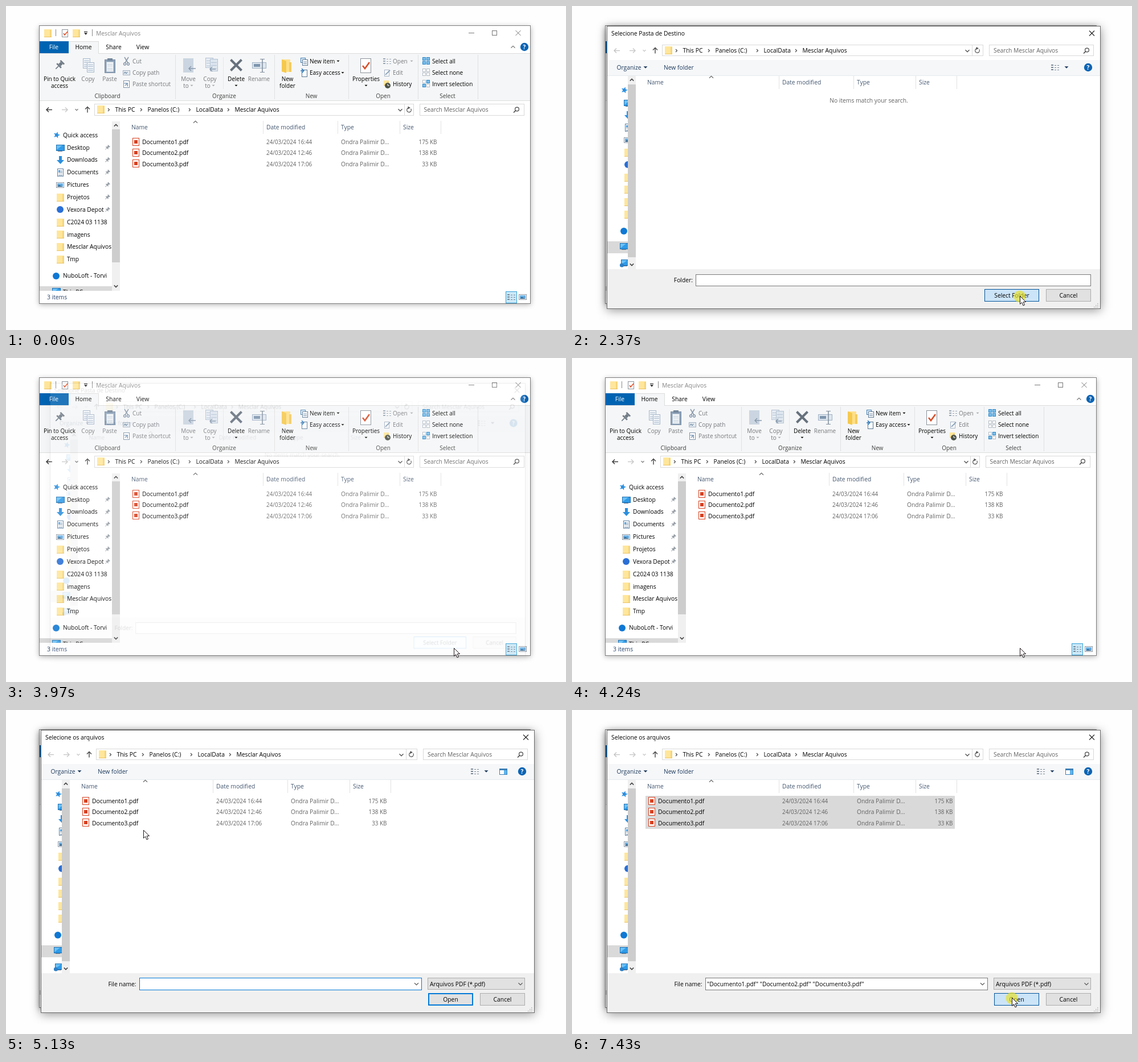
Animation, 983 px wide and 570 px high, one loop 8 s. Source, as an HTML page with a canvas:

```html
<!DOCTYPE html>
<html lang="pt">
<head>
<meta charset="utf-8">
<title>Mesclar Aquivos</title>
<style>
html, body { margin: 0; width: 100%; height: 100%; overflow: hidden; background: #fefefe; }
canvas { display: block; }
</style>
</head>
<body>
<canvas id="stage" width="983" height="570"></canvas>
<script>
const W = 983, H = 570, LOOP = 8000;
const screen = document.getElementById('stage').getContext('2d');
const layer = document.createElement('canvas');
layer.width = W;
layer.height = H;
const layerCtx = layer.getContext('2d');
let g = screen;

const INK = '#000', DIM = '#75787c', GREY = '#626262', HEAD = '#43566f', BLUE = '#0078d7', LINE = '#dcdcdc';

// ---------- drawing helpers ----------
function box(x, y, w, h, fill, stroke, lw = 1) {
  if (fill) { g.fillStyle = fill; g.fillRect(x, y, w, h); }
  if (stroke) {
    g.strokeStyle = stroke; g.lineWidth = lw;
    g.strokeRect(x + lw / 2, y + lw / 2, w - lw, h - lw);
  }
}
function path(pts, close) {
  g.beginPath();
  for (let i = 0; i < pts.length; i += 2) g.lineTo(pts[i], pts[i + 1]);
  if (close) g.closePath();
}
function line(pts, color, lw = 1) {
  path(pts); g.strokeStyle = color; g.lineWidth = lw; g.stroke();
}
function poly(pts, fill) { path(pts, true); g.fillStyle = fill; g.fill(); }
function disc(x, y, r, fill) {
  g.beginPath(); g.arc(x, y, r, 0, 7); g.fillStyle = fill; g.fill();
}
function arc(x, y, r, a, b, color, lw = 1) {
  g.beginPath(); g.arc(x, y, r, a, b); g.strokeStyle = color; g.lineWidth = lw; g.stroke();
}
function text(s, x, y, color = INK, size = 10.3, align = 'left') {
  g.font = size + 'px "Open Sans", "Noto Sans", sans-serif';
  g.textAlign = align; g.fillStyle = color;
  g.fillText(s, x, Math.round(y + 3.6));
}
function at(x, y, draw) { g.save(); g.translate(x, y); draw(); g.restore(); }
function clip(x, y, w, h, draw) {
  g.save(); g.beginPath(); g.rect(x, y, w, h); g.clip(); draw(); g.restore();
}
function panel(x, y, w, h, blur, alpha) {
  g.save();
  g.shadowColor = `rgba(0,0,0,${alpha})`; g.shadowBlur = blur; g.shadowOffsetY = blur / 5;
  box(x, y, w, h, '#fff');
  g.restore();
}
const vee = (x, y, r, color, lw = 1.2, up = 1) => line([x - r, y - r / 2 * up, x, y + r / 2 * up, x + r, y - r / 2 * up], color, lw);
const drop = (x, y, color = INK, r = 3) => poly([x - r, y - r / 2, x + r, y - r / 2, x, y + r / 2], color);
const cross = (x, y, r, color, lw = 1) => { line([x - r, y - r, x + r, y + r], color, lw); line([x + r, y - r, x - r, y + r], color, lw); };
function arrow(x, y, r, dir, color) {
  at(x, y, () => {
    g.rotate(dir);
    line([-r, 0, r, 0], color, 1.4);
    line([r - 4, -4, r, 0, r - 4, 4], color, 1.4);
  });
}

// ---------- icons ----------
function folder(x, y, w = 13, h = 14) {
  const l = Math.round(x - w / 2), t = Math.round(y - h / 2);
  box(l, t, w, h, '#ffe69b');
  box(l + w - 3, t + 1, 3, h - 1, '#f6d57a');
  box(l, t + h - 1, w, 1, '#e9c362');
}
function page(x, y, w, h, edge, fill = '#fff', rows = 3) {
  const l = Math.round(x - w / 2), t = Math.round(y - h / 2);
  box(l, t, w, h, fill, edge);
  for (let i = 1; i <= rows; i++) box(l + 2, Math.round(t + h * i / (rows + 1)), w - 4, 1, edge);
}
function pdf(x, y) {
  page(x, y, 12, 14, '#d8401f', '#fff', 0);
  box(x - 3, y - 3, 6, 6, '#d8401f');
}
function monitor(x, y) {
  box(x - 7, y - 6, 15, 11, '#2f9be8', '#1b6fb3');
  poly([x - 6, y + 3, x - 6, y - 5, x + 4, y - 5], '#6bc0f5');
  box(x - 4, y + 5, 8, 1, '#6b7f93');
}
function pin(x, y, s, color) {
  at(x, y, () => {
    g.rotate(Math.PI / 4); g.scale(s, s);
    box(-3.5, -6, 7, 2, color); box(-2, -4, 4, 4, color);
    box(-4, 0, 8, 2, color); box(-.6, 2, 1.2, 5, color);
  });
}
function star(x, y) {
  const pts = [];
  for (let i = 0; i < 10; i++) {
    const r = i % 2 ? 2.6 : 6, a = i * Math.PI / 5 - 1.3;
    pts.push(x + r * Math.cos(a), y + r * Math.sin(a));
  }
  poly(pts, '#2b8fdf');
}
function help(x, y) {
  disc(x, y, 7.2, '#0a64b4');
  g.font = 'bold 10px "Open Sans", sans-serif'; g.textAlign = 'center'; g.fillStyle = '#fff';
  g.fillText('?', x, y + 4);
}
function glass(x, y) {
  arc(x + 1, y - 1.5, 3.4, 0, 7, '#444', 1.2);
  line([x - 1.5, y + 1, x - 5, y + 4.5], '#444', 1.6);
}
function refresh(x, y) {
  arc(x, y + .5, 3.8, -.6, 4.4, '#555', 1.3);
  poly([x - 2, y - 6, x + 2.5, y - 3.5, x - 2, y - 1], '#555');
}
function details(x, y, color = '#7b8794') {
  for (let i = -4; i <= 4; i += 4) {
    box(x - 7, y + i - 1, 4, 2, null, color);
    box(x - 1, y + i, 3, 1, color); box(x + 4, y + i, 3, 1, color);
  }
}
function picture(x, y) {
  box(x - 7, y - 5, 14, 10, '#fff', '#8b97a3');
  box(x - 5, y - 3, 10, 6, '#6aaee0');
  poly([x - 5, y + 3, x - 2, y, x + 5, y + 3], '#2f5f86');
}

// ---------- shared parts ----------
function sidebar(labels) {
  box(59, 493, 127, 21, '#d9d9d9');
  star(89, 227);
  monitor(95, 250);
  poly([93, 264, 98, 264, 98, 271, 102, 271, 95.5, 278, 89, 271, 93, 271], '#2b8fdf');
  page(95.5, 293, 11, 14, '#5d7f9e'); box(92, 289, 3, 3, '#3f97dd');
  picture(95, 315);
  for (const y of [337, 381, 402, 424, 446]) folder(95.5, y);
  disc(95, 358, 6, '#2a6fd6');
  disc(88, 475, 6, '#0f78d4');
  monitor(88, 502);
  monitor(90, 531); disc(84.5, 535, 3.6, '#2d7fc4');
  if (!labels) return;
  const names = ['Desktop', 'Downloads', 'Documents', 'Pictures', 'Projetos', 'Vexora Depot',
    'C2024 03 1138', 'imagens', 'Mesclar Aquivos', 'Tmp'];
  text('Quick access', 100, 227);
  names.forEach((s, i) => {
    const y = 249 + i * 21.85;
    text(s, 107, y);
    if (i < 6) pin(178, y, .72, '#8f979f');
  });
  text('NuboLoft - Torvi', 100, 474.5);
  text('This PC', 100, 503);
}
function scroller(x, y, h, top, bottom) {
  box(x, y, 14, h, '#f0f0f0');
  box(x, top, 14, bottom - top, '#cdcdcd');
  vee(x + 7, y + 7, 3.2, '#444', 1.5, -1);
  vee(x + 7, y + h - 8, 3.2, '#444', 1.5);
}
function address(active) {
  arrow(76, 182.5, 5, Math.PI, active ? '#333' : '#c4c4c4');
  arrow(103, 182.5, 5, 0, '#c8c8c8');
  vee(124, 182.5, 2.5, active ? '#777' : '#c4c4c4');
  arrow(143, 182.5, 5, -Math.PI / 2, '#444');
  folder(166, 182);
  ['This PC', 'Panelos (C:)', 'LocalData', 'Mesclar Aquivos'].forEach((s, i) => {
    const x = [180, 237, 322, 390][i];
    line([x - 1, 180, x + 1.5, 182.5, x - 1, 185], '#444', 1.1);
    text(s, x + 11.5, 182.5);
  });
}
function fileList(rows, fill, edge) {
  [451, 582, 691, 763].forEach(x => box(x, 202, 1, 23, '#e2e2e2'));
  vee(332.5, 204, 3.5, '#666', 1.1, -1);
  text('Name', 220, 213.5, HEAD); text('Date modified', 457, 213.5, HEAD);
  text('Type', 588, 213.5, HEAD); text('Size', 697, 213.5, HEAD);
  if (!rows) return;
  [['16:44', 175], ['12:46', 138], ['17:06', 33]].forEach(([time, kb], i) => {
    const y = 239.5 + i * 19.2;
    if (rows[i]) box(217, Math.round(230 + i * 19.2), 543, 20, fill, edge);
    pdf(228, Math.round(y - .5));
    text(`Documento${i + 1}.pdf`, 239, y);
    text('24/03/2024 ' + time, 457, y, GREY, 9.9);
    text('Ondra Palimir D...', 588, y, GREY);
    text(kb + ' KB', 756.5, y, GREY, 9.9, 'right');
  });
}

// ---------- explorer window ----------
function ribbon() {
  const label = (s, x, y, c) => text(s, x, y, c, 10, 'center');
  const small = (s, x, y, c) => text(s, x, y, c, 10);
  [297, 471, 601, 723, 828].forEach(x => box(x, 86, 1, 78, '#e0e1e2'));
  [['Clipboard', 178], ['Organize', 383], ['New', 536], ['Open', 662], ['Select', 775]]
    .forEach(([s, x]) => label(s, x, 158, '#404040'));

  pin(94, 104, 1.35, '#717c87');
  label('Pin to Quick', 94, 128); label('access', 94, 140);
  page(141, 101, 13, 18, '#a9b9cb', '#eef3f8', 4); page(148, 108, 13, 18, '#a9b9cb', '#eef3f8', 4);
  label('Copy', 144, 128, DIM);
  box(173, 94, 19, 24, '#8ba0b8', '#7d90a6'); page(182.5, 107, 13, 18, '#b9c6d4', '#f4f7fa', 4);
  box(178, 92, 9, 4, '#75879b');
  label('Paste', 182, 128, DIM);
  line([208, 90, 214, 100], '#8a99aa', 1.5); line([215, 90, 209, 100], '#8a99aa', 1.5);
  arc(208.5, 102, 2, 0, 7, '#7f92a8', 1.3); arc(214.5, 102, 2, 0, 7, '#7f92a8', 1.3);
  small('Cut', 222, 97, DIM);
  box(205, 113, 13, 9, '#e2e8ef', '#a5b3c2'); line([207, 119, 209, 116, 211, 119, 213, 116], '#50718f');
  small('Copy path', 222, 117.5, DIM);
  page(211, 137.5, 11, 13, '#7f92a8', '#fff', 0); arrow(211, 138, 3, -Math.PI / 4, '#6b8bad');
  small('Paste shortcut', 222, 137.5, DIM);

  box(311, 92, 18, 25, '#cbd5e1'); arrow(327, 110, 6, Math.PI, '#8496a9');
  label('Move', 320, 128, DIM); label('to', 316, 140, DIM); drop(326, 140, '#aaa', 2.5);
  page(357, 100, 14, 18, '#b5c3d3', '#e6ecf3', 3); page(365, 104, 14, 22, '#b5c3d3', '#dde5ee', 3);
  arrow(363, 111, 5, Math.PI, '#8496a9');
  label('Copy', 358, 128, DIM); label('to', 354, 140, DIM); drop(364, 140, '#aaa', 2.5);
  box(381, 90, 1, 56, '#e6e7e8');
  cross(404, 104, 9.5, '#66717e', 4);
  label('Delete', 404, 128); drop(404, 140, INK, 2.5);
  box(432, 99, 25, 11, '#dfe7ef', '#9fb1c4'); box(435, 102, 11, 5, '#7e95ad');
  line([446, 93.5, 454, 93.5], '#7e8c9b'); line([450, 93, 450, 116], '#7e8c9b', 1.5); line([446, 116.5, 454, 116.5], '#7e8c9b');
  label('Rename', 444, 128, DIM);

  box(484, 94, 15, 22, '#ffe08a'); poly([484, 94, 492, 97, 492, 118, 484, 115], '#f5c94f'); box(497, 99, 4, 17, '#f3cb60');
  label('New', 494, 128); label('folder', 494, 140);
  page(521, 95, 9, 9, '#3f7fb4', '#dcebf7', 0); page(525, 99, 10, 11, '#5a7894', '#fff', 2);
  small('New item', 533, 97); drop(583, 97, INK, 2.5);
  page(524, 118, 10, 13, '#5a7894', '#fff', 0); arrow(520, 114, 3, 0, '#2b7ec4');
  small('Easy access', 533, 117.5); drop(591, 117.5, INK, 2.5);

  page(631, 105, 19, 26, '#8b9299', '#fff', 0); line([626, 105, 630, 110, 638, 99], '#d8502a', 2.6);
  label('Properties', 632, 128); drop(632, 140, INK, 2.5);
  details(669, 97, '#9aa7b5'); small('Open', 679, 97, DIM); drop(712, 97, '#aaa', 2.5);
  page(668, 117.5, 9, 12, '#a4b3c3', '#fff', 0); line([666, 121, 674, 113], '#8fa5bb', 2);
  small('Edit', 679, 117.5, DIM);
  folder(667, 135, 9, 9); disc(670, 140, 5, '#4b5247'); line([670, 137, 670, 140, 673, 140], '#fff');
  small('History', 679, 137.5);

  const grid = (y, on) => [0, 1, 2, 3].forEach(i => {
    const lit = on(i);
    box(731 + i % 2 * 7, y - 7 + (i >> 1) * 7, 6, 6, lit ? '#7cc0ee' : '#fff', lit ? '#2a86c8' : '#b3bcc5');
  });
  grid(97, () => true); small('Select all', 748, 97);
  grid(117, () => false); small('Select none', 748, 117.5);
  grid(137, i => i === 1 || i === 2); small('Invert selection', 748, 137.5);
}
function explorer() {
  panel(58, 34, 863, 490, 9, .3);
  folder(73.5, 47.5);
  box(87, 41, 1, 12, '#888');
  page(103.5, 48, 11, 14, '#8b9299', '#fff', 0); line([101, 48, 103, 51, 108, 45], '#d8502a', 1.6);
  folder(123.5, 47.5);
  box(137, 45, 6, 1, INK); drop(140, 49, INK);
  box(151, 41, 1, 12, '#888');
  text('Mesclar Aquivos', 158, 48, '#858585');
  box(812, 47, 10, 1, '#777'); box(853, 43, 9, 9, null, '#777'); cross(899, 47.5, 4.5, '#777');

  box(59, 83, 861, 84, '#f5f6f7');
  box(59, 83, 861, 1, LINE); box(59, 166, 861, 1, LINE);
  box(59, 62, 51, 21, '#0063b1');
  box(110, 62, 53, 22, '#f5f6f7'); box(162, 62, 1, 22, LINE); box(110, 62, 53, 1, LINE);
  text('File', 84, 72.5, '#fff', 10.3, 'center'); text('Home', 136, 72.5, INK, 10.3, 'center');
  text('Share', 189, 72.5, INK, 10.3, 'center'); text('View', 240, 72.5, INK, 10.3, 'center');
  vee(890, 72, 3.5, '#777', 1.1, -1);
  help(910, 72);
  ribbon();

  box(155, 172, 561, 21, '#fff', '#d9d9d9'); box(699, 173, 1, 19, '#d9d9d9');
  address(true);
  vee(692, 183, 3.5, '#555', 1.4); refresh(707.5, 182.5);
  box(726, 172, 184, 21, '#fff', '#d9d9d9');
  text('Search Mesclar Aquivos', 733.5, 182.5, GREY); glass(896, 183);

  clip(59, 203, 127, 298, () => sidebar(true));
  scroller(186, 203, 298, 217, 451);
  fileList([]);
  text('3 items', 72, 512.5, '#26426b');
  box(877, 502, 20, 21, '#cce8f7', '#35a0d8'); details(887, 512);
  picture(907, 512);
  box(58, 34, 863, 490, null, '#7d7d7d');
}

// ---------- dialogs ----------
const inside = (p, x, y, w, h) => p && p.x >= x && p.x < x + w && p.y >= y && p.y < y + h;

function button(label, x, w, p, pressed, main) {
  const over = inside(p, x, 498, w, 22);
  if (pressed && over) box(x, 498, w, 22, '#cce4f7', '#005499');
  else if (over) box(x, 498, w, 22, '#e5f1fb', BLUE);
  else box(x, 498, w, 22, '#e1e1e1', main ? BLUE : '#adadad', main ? 2 : 1);
  text(label, x + w / 2, 509, INK, 10.3, 'center');
}
function dialog(title, pane) {
  panel(61, 35, 867, 498, 17, .42);
  text(title, 69, 48.5);
  cross(912.5, 48, 4.5, '#222', 1.1);
  box(158, 68, 564, 20, '#fff', '#d9d9d9'); box(702, 69, 1, 18, '#d9d9d9');
  at(3, -104, () => address(false));
  vee(694, 79, 3.5, '#555', 1.4); refresh(711.5, 78);
  box(732, 68, 184, 20, '#fff', '#d9d9d9');
  text('Search Mesclar Aquivos', 740, 78, GREY); glass(903, 79);

  box(62, 95, 865, 28, '#f5f7f9'); box(62, 122, 865, 1, '#e6eaee');
  text('Organize', 78.5, 108, '#1e395b'); drop(129, 108, '#1e395b', 3.5);
  text('New folder', 161, 108, '#1e395b');
  const vx = pane ? 823 : 848;
  details(vx, 108); drop(vx + 20, 108, '#1e395b', 3.5);
  if (pane) { box(866, 103, 14, 11, '#fff', '#3d7fb5'); box(874, 104, 5, 9, '#5bb4ee'); box(867, 104, 12, 2, '#3d7fb5'); }
  help(906, 108);

  clip(62, 123, 36, 340, () => at(3, -79, () => sidebar(false)));
  scroller(98, 123, 340, 138, 442);
  box(62, 463, 865, 69, '#f0f0f0');
  for (let i = 0; i < 3; i++) for (let j = 0; j <= i; j++) box(922 - j * 3, 523 + i * 3, 1.5, 1.5, '#b5b5b5');
}
function frame() { box(61, 35, 867, 498, null, '#6a6a6a'); }

function folderDialog(t, p) {
  dialog('Selecione Pasta de Destino', false);
  at(-88, -79, () => fileList(null));
  text('No items match your search.', 521, 166, GREY, 10.3, 'center');
  text('Folder:', 212, 482.5, INK, 10.3, 'right');
  box(217, 472, 694, 21, '#fff', t < 2370 ? BLUE : '#7a7a7a');
  button('Select Folder', 724, 96, p, t >= 2370 && t < 3830, true);
  button('Cancel', 832, 79, p);
  frame();
}
const DRAG = { x: 250, y: 214, from: 5540, to: 6000 };
function filesDialog(t, p) {
  dialog('Selecione os arquivos', true);
  const rowTop = i => 151 + i * 19.2;
  const picked = [0, 1, 2].map(i => t >= DRAG.to || (t >= DRAG.from && p.y < rowTop(i + 1)));
  const hover = [0, 1, 2].map(i => inside(p, 129, rowTop(i), 543, 19.2));
  const choosing = t >= DRAG.from;
  at(-88, -79, () => {
    if (t >= 7430) fileList(picked, '#d9d9d9');
    else if (choosing) fileList(picked, '#cce8ff', '#99d1ff');
    else fileList(hover, '#e5f3ff');
  });
  if (choosing && t < DRAG.to) {
    const x = Math.round(Math.min(p.x, DRAG.x)), y = Math.round(Math.min(p.y, DRAG.y));
    box(x, y, Math.abs(DRAG.x - p.x), Math.abs(DRAG.y - p.y), 'rgba(0,120,215,.25)', BLUE);
  }
  text('File name:', 228.5, 482, INK, 10.3, 'right');
  box(234, 471, 496, 22, '#fff', choosing ? '#7a7a7a' : BLUE);
  vee(720.5, 482, 3.5, '#555', 1.1);
  const names = [1, 2, 3].filter(n => picked[n - 1]).map(n => `Documento${n}.pdf`);
  text(names.length > 1 ? names.map(n => `"${n}"`).join(' ') : names.join(''), 237, 482);
  if (t < 4600) box(237, 475, 1, 13, INK);
  const over = inside(p, 740, 471, 171, 21);
  box(740, 471, 171, 21, over ? '#e5f1fb' : '#e1e1e1', over ? BLUE : '#adadad');
  text('Arquivos PDF (*.pdf)', 744, 482); vee(903, 482, 3.5, '#555', 1.1);
  button('Open', 741, 79, p, t >= 7430, true);
  button('Cancel', 832, 79, p);
  frame();
}
function show(draw, t, p, scale, alpha) {
  layerCtx.clearRect(0, 0, W, H);
  g = layerCtx;
  draw(t, p);
  g = screen;
  g.save();
  g.globalAlpha = alpha;
  g.translate(494, 284); g.scale(scale, scale); g.translate(-494, -284);
  g.drawImage(layer, 0, 0);
  g.restore();
}

// ---------- pointer ----------
const TRACK = [
  [1560, 684, 575], [1750, 704, 556], [2000, 762, 524], [2220, 786, 510], [4600, 786, 510],
  [4690, 780, 480], [4780, 752, 416], [4850, 690, 336], [4960, 460, 250], [5060, 262, 197],
  [5130, 241, 211], [5340, 250, 214], [5520, 250, 214], [6000, 205, 150], [6180, 205, 150],
  [6320, 262, 197], [6500, 400, 270], [6700, 690, 420], [6850, 850, 500], [6950, 894, 524],
  [7020, 880, 526], [7160, 828, 525], [7380, 772, 506], [LOOP, 772, 506]
];
function pointer(t) {
  const i = TRACK.findIndex(k => k[0] > t);
  if (i < 1) return null;
  const [t0, x0, y0] = TRACK[i - 1], [t1, x1, y1] = TRACK[i];
  const k = (t - t0) / (t1 - t0);
  return { x: x0 + (x1 - x0) * k, y: y0 + (y1 - y0) * k };
}
function drawPointer(p, click) {
  if (click) disc(p.x, p.y + 1, 10.5, 'rgba(232,226,40,.68)');
  at(Math.round(p.x) + .5, Math.round(p.y) + .5, () => {
    path([0, 0, 0, 14, 3.2, 11, 5.5, 16.5, 8, 15.4, 5.7, 10.2, 10, 10], true);
    g.fillStyle = '#fff'; g.fill();
    g.strokeStyle = '#1c1418'; g.lineWidth = 1; g.stroke();
  });
}

// ---------- timeline ----------
function render(t) {
  const p = pointer(t);
  screen.fillStyle = '#fefefe';
  screen.fillRect(0, 0, W, H);
  explorer();
  if (t >= 1400 && t < 2370) show(folderDialog, t, p, .997, .93);
  else if (t >= 2370 && t < 3830) show(folderDialog, t, p, 1, 1);
  else if (t >= 3830 && t < 4000) {
    const k = (t - 3830) / 170;
    show(folderDialog, t, p, 1 - .045 * k, Math.pow(1 - k, 1.2));
  } else if (t >= 4240) {
    const rest = Math.max(0, 1 - (t - 4240) / 330);
    show(filesDialog, t, p, 1 - .1 * Math.pow(rest, 7), 1 - Math.pow(rest, 5.4));
  }
  if (p) drawPointer(p, (t >= 2370 && t < 3830) || t >= 7430);
}
let start;
function tick(now) {
  if (start === undefined) start = now;
  render((now - start) % LOOP);
  requestAnimationFrame(tick);
}
requestAnimationFrame(tick);
</script>
</body>
</html>
```
